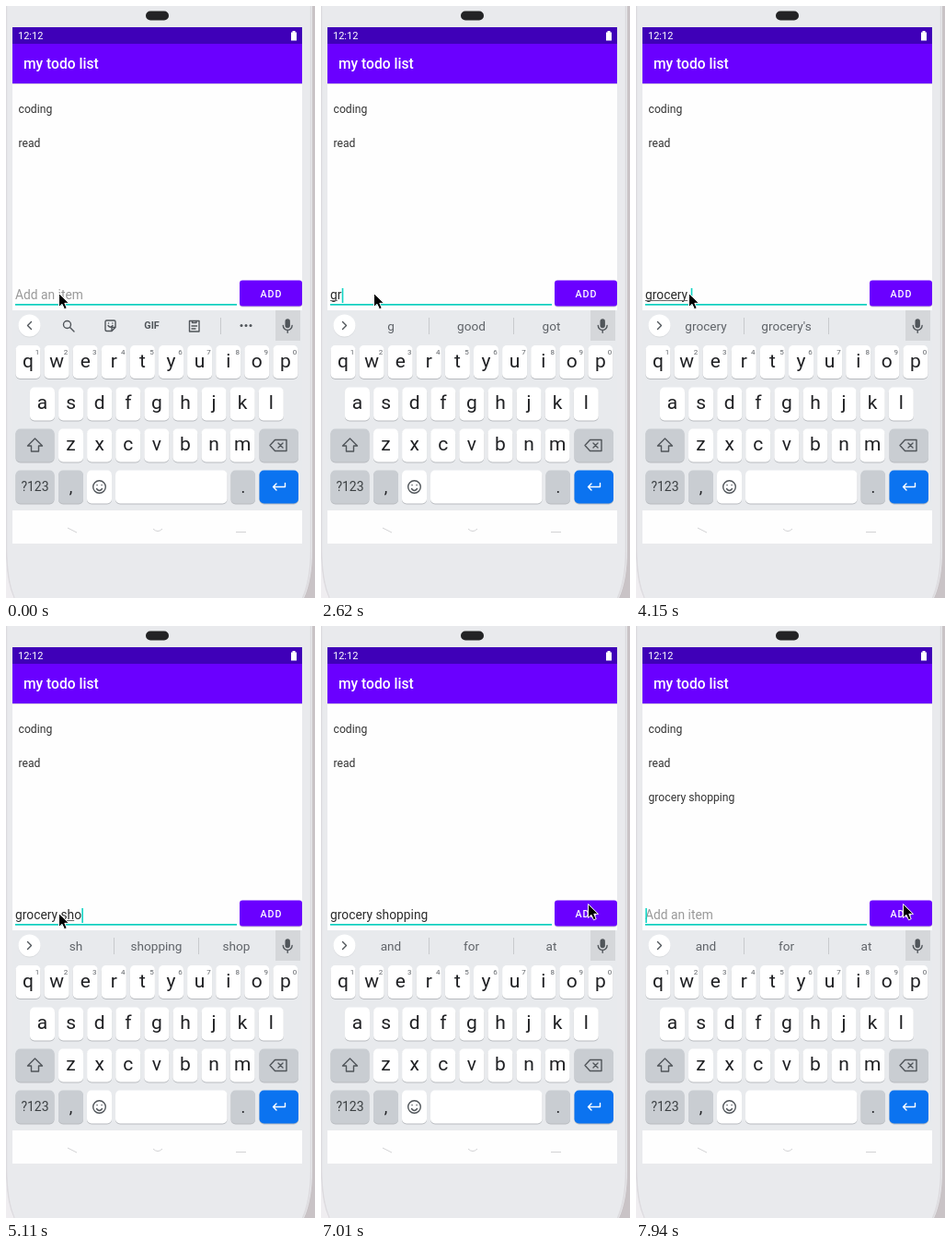
Recreate the animation shown at these times as an HTML page. Size 336 by 642 pixels, loop 8 s.

```html
<!DOCTYPE html>
<html lang="en">
<head>
<meta charset="utf-8">
<title>my todo list</title>
<style>
html, body { margin: 0; height: 100%; overflow: hidden; background: #e9eaed; }
svg { display: block; width: 336px; height: 642px; font-family: Roboto, sans-serif; }
text { white-space: pre; }
.mid { text-anchor: middle; }
.line { fill: none; stroke: #50555a; stroke-width: 1.4; stroke-linecap: round; stroke-linejoin: round; }
.strip { font-size: 13.6px; fill: #5f6368; text-anchor: middle; }
</style>
</head>
<body>
<svg viewBox="0 0 336 642">
  <!-- phone body -->
  <rect width="336" height="642" fill="#e9eaed"/>
  <path d="M333 0V590Q333 622 324 642H336V0z" fill="#c9c3c6"/>
  <path d="M331.500 0V590Q331.500 622 322.500 642M.5 0V590Q1 624 9 642" fill="none" stroke="#dcdade" stroke-width="1.500"/>
  <path d="M0 600Q1 626 8.500 642H0z" fill="#efedf0"/>
  <rect x="152" y="5.500" width="25" height="10" rx="5" fill="#232325"/>

  <!-- app -->
  <rect x="7" y="23" width="315" height="307" fill="#fefefe"/>
  <rect x="7" y="84" width="315" height="1" fill="#dedee2"/>
  <rect x="7" y="41" width="315" height="43" fill="#6a00ff"/>
  <rect x="7" y="23" width="315" height="18" fill="#3f00b8"/>
  <text x="13" y="36" font-size="11" fill="#fff">12:12</text>
  <path d="M310 28.500h1.500v-1.500h3v1.500h1.500v9h-6z" fill="#fff"/>
  <text x="19" y="68" font-size="15.600" font-weight="500" fill="#fff">my todo list</text>
  <g font-size="12.200" fill="#333">
    <text x="13.500" y="116">coding</text>
    <text x="13.500" y="153">read</text>
    <text id="item" x="13.500" y="190">grocery shopping</text>
  </g>
  <text id="entry" x="10" y="318" font-size="13.800"></text>
  <rect id="compose" y="319" height="1" fill="#666"/>
  <rect id="caret" y="306" width="1.600" height="16" fill="#12d5c5"/>
  <rect x="10" y="323" width="241" height="1.700" fill="#0bcfbf"/>
  <rect x="254" y="299" width="68" height="27.500" rx="3" fill="#cfcdd6"/>
  <rect x="254" y="297.500" width="68" height="28" rx="3" fill="#6a00ff"/>
  <rect id="ripple" x="254" y="297.500" width="68" height="28" rx="3" fill="#fff"/>
  <text class="mid" x="288.500" y="316" font-size="10.700" font-weight="500" letter-spacing="1" fill="#fff">ADD</text>

  <!-- keyboard -->
  <rect x="7" y="330" width="315" height="217" fill="#e8eaed"/>
  <rect x="293" y="330" width="27" height="33" fill="#d5d7da"/>
  <circle cx="25.500" cy="347.500" r="12" fill="#d8dadd"/>
  <circle cx="25.500" cy="346.500" r="12" fill="#fff"/>
  <path id="chevron" class="line"/>
  <path d="M303.500 342a2.700 2.700 0 0 1 5.400 0v4.500a2.700 2.700 0 0 1-5.400 0z" fill="#50555a"/>
  <path class="line" d="M301.300 346.500a4.900 4.900 0 0 0 9.800 0M306.200 351.700v2.500"/>
  <g id="tools">
    <path class="line" d="M70.500 345.500a4 4 0 1 1-8 0a4 4 0 1 1 8 0M69.500 348.500l4.500 4.500
      M109.500 341h8q1.500 0 1.500 1.500v6l-4 4h-5.500q-1.500 0-1.500-1.500v-8.500q0-1.500 1.500-1.500zM115 352v-3.500h3.500M111 346.500q2.500 3.500 5 0M111.500 344h.1M115.800 344h.1
      M199.500 341.500h10.500v11.500h-10.500zM202.500 341.500v2h4.500v-2zM202 347h5.500M202 350h4"/>
    <text class="mid" x="158.500" y="350" font-size="10.800" font-weight="700" fill="#50555a">GIF</text>
    <path d="M233.500 338v18" stroke="#c8cacd"/>
    <g fill="#50555a"><circle cx="256" cy="346.500" r="1.500"/><circle cx="261" cy="346.500" r="1.500"/><circle cx="266" cy="346.500" r="1.500"/></g>
  </g>
  <g id="strip">
    <path d="M117.500 338v18M209.500 338v18" stroke="#c8cacd"/>
    <text class="strip" x="76" y="352"></text>
    <text class="strip" x="163.500" y="352"></text>
    <text class="strip" x="250.500" y="352"></text>
  </g>
  <g id="keys"></g>
  <path class="line" d="M31.500 469l8 8h-4v6h-8v-6h-4z"/>
  <path class="line" d="M287 476.500l5.500-6h12.500v12h-12.500zM296 474l5 5M301 474l-5 5"/>
  <circle class="line" cx="101.500" cy="521.500" r="6.800"/>
  <path class="line" d="M98.500 523.500q3 4 6 0M99 519.500h.1M104 519.500h.1"/>
  <path class="line" d="M303.500 517.500v4h-13M294 518l-3.500 3.500l3.500 3.500" style="stroke:#fff"/>

  <!-- navigation bar -->
  <rect x="7" y="547" width="315" height="36" fill="#fefefe"/>
  <path d="M67 566l10 5M160 567q5 5 10 0M250 570.500h11" fill="none" stroke="#d2d2d4"/>

  <path id="mouse" d="M0 0V15L3.500 11.800L6 17.300L8.700 16.100L6.300 10.800H11z" fill="#000" stroke="#fff" stroke-width="1"/>
</svg>
<script>
const $ = id => document.getElementById(id);
const LOOP = 8000;

// Keyboard
function key(x, y, w, label = '', fill = '#fff', size = 21, dy = 24, color = '#202124') {
  const rect = (top, color) =>
    `<rect x="${x}" y="${top}" width="${w}" height="36" rx="5" fill="${color}"/>`;
  return rect(y + 1, '#b9bcc0') + rect(y, fill) +
    `<text class="mid" x="${x + w / 2}" y="${Math.floor(y + dy)}" font-size="${size}" fill="${color}">${label}</text>`;
}
const GREY = '#c9cdd2', PITCH = 31.1, KEY = 27;
const row = (letters, x, y) =>
  [...letters].map((c, i) => key(x + i * PITCH, y, KEY, c)).join('');
const digits = [...'1234567890'].map((d, i) =>
  `<text class="mid" x="${34 + i * PITCH}" y="377.500" font-size="8" fill="#5f6368">${d}</text>`).join('');
$('keys').innerHTML =
  row('qwertyuiop', 10.5, 368) + digits +
  row('asdfghjkl', 26, 413.5) +
  key(10.5, 458.5, 42, '', GREY) + row('zxcvbnm', 57, 458.5) + key(275.5, 458.5, 42.5, '', GREY) +
  key(10.5, 503.5, 42, '?123', GREY, 14, 23, '#3c4043') +
  key(57, 503.5, KEY, ',', GREY, 18, 25) + key(88, 503.5, KEY) +
  key(119, 503.5, 121.5) + key(244.5, 503.5, 26.5, '.', GREY, 18, 25) +
  key(275.5, 503.5, 42.5, '', '#0b73f0');

// Each step: time, then the fields that change
const steps = [
  [0, { text: '', caret: 0, under: 0, words: '', item: 0, ripple: 0, mouse: [57.5, 311.5] }],
  [480, { caret: 1 }], [960, { caret: 0 }], [1430, { caret: 1 }], [1910, { caret: 0 }],
  [2260, { text: 'g', caret: 1 }],
  [2500, { under: 1, words: 'g,good,got' }],
  [2620, { text: 'gr' }],
  [2740, { text: 'gro', under: 2, words: 'gr,great,green' }],
  [2970, { under: 3, words: 'gro,grocery,group' }],
  [3210, { text: 'groc' }],
  [3450, { under: 4, words: 'groc,grocery,groceries' }],
  [3570, { text: 'groce' }],
  [3690, { under: 5, words: 'groce,grocery,groceries' }],
  [3800, { text: 'grocer' }],
  [3920, { text: 'grocery', under: 6, words: 'grocer,grocery,groceries' }],
  [4030, { under: 7, words: "grocery,grocery's," }],
  [4150, { text: 'grocery ' }],
  [4390, { under: 0, words: 'store,shopping,list' }],
  [4870, { text: 'grocery s' }],
  [4990, { text: 'grocery sh', under: 9, words: 's,store,shopping' }],
  [5110, { text: 'grocery sho', under: 10, words: 'sh,shopping,shop' }],
  [5230, { text: 'grocery shop', under: 11, words: 'sho,shopping,shop' }],
  [5350, { text: 'grocery shopp', under: 12, words: 'shop,shops,shopping' }],
  [5470, { under: 13, words: 'shopp,shopping,shopped' }],
  [5700, { text: 'grocery shoppi' }],
  [5820, { text: 'grocery shoppin', under: 14, words: 'shoppi,shopping,shipping' }],
  [5940, { text: 'grocery shopping', under: 15, words: 'shoppin,shopping,' }],
  [6060, { text: 'grocery shopping ', under: 16 }],
  [6180, { words: "shopping,shipping,shopping's" }],
  [6300, { under: 0, words: 'and,for,at' }],
  [6540, { mouse: [92, 308] }],
  [6660, { mouse: [175, 298] }],
  [6780, { mouse: [248, 289], caret: 0 }],
  [6890, { mouse: [284, 297] }],
  [7010, { mouse: [290.5, 301.5] }],
  [7360, { caret: 1, ripple: .12 }],
  [7480, { text: '', item: 1, ripple: .24 }],
  [7600, { ripple: .18 }], [7710, { ripple: .1 }], [7830, { ripple: .04 }], [7940, { ripple: 0 }],
];

const pen = document.createElement('canvas').getContext('2d');
function endOf(text) {
  pen.font = '13.8px Roboto, sans-serif';
  return 10 + pen.measureText(text).width;
}
const show = (id, on) => $(id).setAttribute('visibility', on ? 'visible' : 'hidden');

function draw(time) {
  const s = Object.assign({}, ...steps.filter(([at]) => at <= time).map(([, change]) => change));
  $('entry').textContent = s.text || 'Add an item';
  $('entry').setAttribute('fill', s.text ? '#2b2b2b' : '#999');
  $('caret').setAttribute('x', endOf(s.text) + .3);
  show('caret', s.caret);

  const start = endOf(s.under > 8 ? 'grocery ' : '');
  $('compose').setAttribute('x', start);
  $('compose').setAttribute('width', s.under ? endOf(s.text.slice(0, s.under)) - start : 0);

  show('tools', !s.words);
  show('strip', s.words);
  const words = s.words.split(',');
  document.querySelectorAll('.strip').forEach((el, i) => el.textContent = words[i] || '');
  $('chevron').setAttribute('d', s.words ? 'M23.500 342.500l4 4l-4 4' : 'M27.500 342.500l-4 4l4 4');

  show('item', s.item);
  $('ripple').setAttribute('opacity', s.ripple);
  $('mouse').setAttribute('transform', `translate(${s.mouse})`);
}

const began = performance.now();
function tick() {
  draw((performance.now() - began) % LOOP);
  requestAnimationFrame(tick);
}
tick();
</script>
</body>
</html>
```
